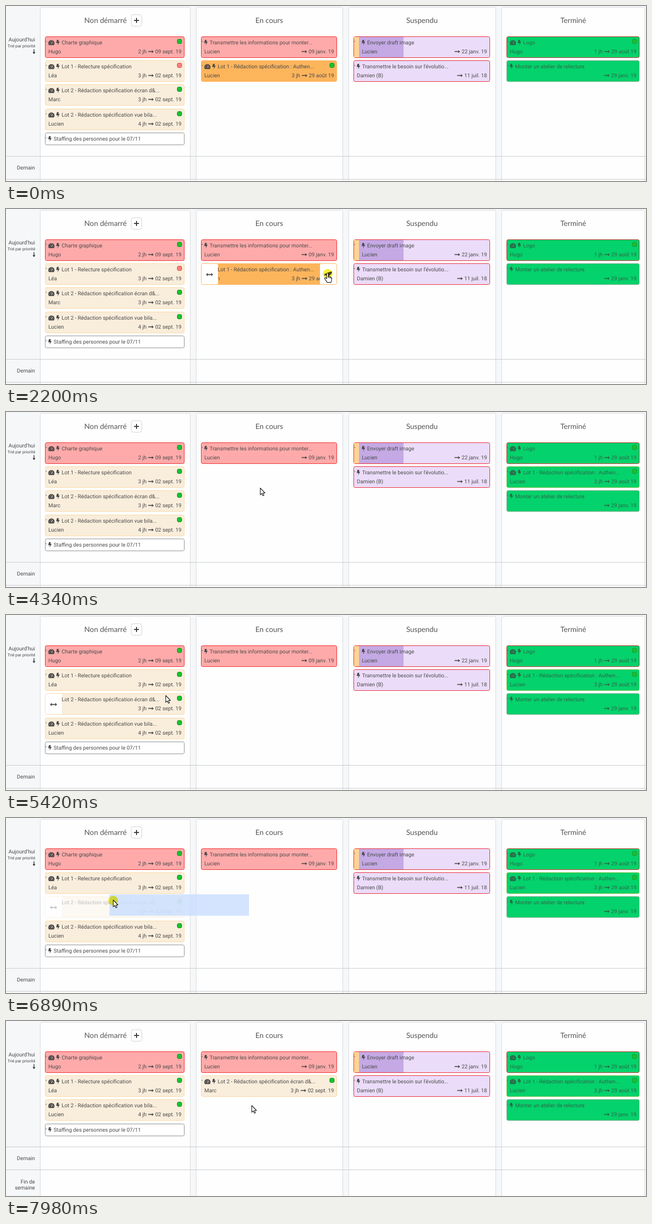
Write an HTML page that moves like this. It is 1280 by 351 pixels and loops after 8 s.

```html
<!DOCTYPE html>
<html lang="fr">
<head>
<meta charset="utf-8">
<title>Tableau des tâches</title>
<style>
  html, body { margin: 0; width: 100%; height: 100%; overflow: hidden; background: #f6f7f9; }
  svg { display: block; width: 100%; height: 100%; }
  text { font: 10.65px Roboto, sans-serif; fill: #4a4a4a; text-rendering: geometricPrecision; }
  .head { font: 14.7px Lato, sans-serif; fill: #555; text-anchor: middle; }
  .end { text-anchor: end; }
  .mid { text-anchor: middle; }
  .bold { font-weight: 700; }
  .link { fill: #2196bf; }
  .done text { fill: #2c6747; }
  #popup { filter: drop-shadow(0 2px 4px rgba(0, 0, 0, .28)); }
  #press { mix-blend-mode: multiply; }
</style>
</head>
<body>
<svg id="stage" viewBox="0 0 1280 351"></svg>
<script>
const LOOP = 8000;
const NS = 'http://www.w3.org/2000/svg';
const stage = document.getElementById('stage');

function add(parent, tag, attrs = {}, content) {
  const el = document.createElementNS(NS, tag);
  for (const k in attrs) el.setAttribute(k, attrs[k]);
  if (content !== undefined) el.textContent = content;
  return parent.appendChild(el);
}
const group = (parent, attrs) => add(parent, 'g', attrs);
const text = (parent, x, y, str, cls = '', size) =>
  add(parent, 'text', { x, y, class: cls, ...(size && { style: `font-size:${size}px` }) }, str);
const path = (parent, d, attrs) => add(parent, 'path', { d, ...attrs });
const box = (parent, x, y, width, height, fill, attrs) =>
  add(parent, 'rect', { x, y, width, height, fill, ...attrs });
const frame = (parent, x, y, w, h, fill, stroke, rx = 3) =>
  box(parent, x + .5, y + .5, w - 1, h - 1, fill, { stroke, rx });
const show = (el, on) => el.setAttribute('visibility', on ? 'visible' : 'hidden');
const move = (el, x, y) => el.setAttribute('transform', `translate(${x} ${y})`);

// Icons
const INK = '#4a4a4a';
const BOLT = 'M1.5 0H5.2L4.2 3.6H7L2.8 11 3.6 6.2H0Z';
const ARROW = 'M0 3.2H7.4V1L11 4 7.4 7V4.8H0Z';
const BOTH = 'M-7 0L-3.6-3.4V-1H3.6V-3.4L7 0 3.6 3.4V1H-3.6V3.4Z';
const ROCKET = 'M8-6Q1-6-2-2H-6L-8 2-4 1.5-1 4.5-1.5 7 2 5 2.5 2Q8-1 8-6Z';

function gauge(parent, x, y, bg, ink) {
  const g = group(parent, { transform: `translate(${x} ${y})` });
  path(g, 'M1.4 10.5A6.2 6.2 0 1 1 11 10.5Z', { fill: ink });
  path(g, 'M6.2 8L8.3 3.6M2.3 7h1M3.4 4h1M6 2.6h.6M9.3 7h1', { stroke: bg, 'stroke-width': 1.1 });
}

// Columns
const COLS = [
  { x: 68, w: 301, card: 78, cw: 279, name: 'Non démarré', cx: 199 },
  { x: 380, w: 294, card: 390, cw: 272, name: 'En cours', cx: 526.5 },
  { x: 685, w: 295, card: 695, cw: 273, name: 'Suspendu', cx: 832 },
  { x: 991, w: 287, card: 1001, cw: 266, name: 'Terminé', cx: 1134.5 }
];
for (const c of COLS) {
  frame(stage, c.x, 2, c.w, 360, '#fefefe', '#d6d9dd');
  text(stage, c.cx, 34, c.name, 'head');
}
frame(stage, 250, 17, 22, 24, '#fff', '#cfcfcf', 4);
path(stage, 'M256 29H266M261 24V34', { stroke: '#3a3a3a', 'stroke-width': 2 });
const target = box(stage, 380.5, 2.5, 293, 360, 'none', { stroke: '#000' });

// Row labels and separators
text(stage, 58, 71, "Aujourd'hui", 'end');
text(stage, 58.5, 82.5, 'Trié par priorité', 'end', 8.2);
path(stage, 'M55.3 86.5H56.7V92.5H58.8L56 96.5 53.2 92.5H55.3Z', { fill: '#333' });
const rows = group(stage);
for (const y of [301.5, 347.5]) path(rows, `M0 ${y}H1280`, { stroke: '#c6c8ca' });
text(rows, 58, 328, 'Demain', 'end');
text(rows, 58, 375, 'Fin de', 'end');
text(rows, 58, 387, 'semaine', 'end');

// Cards
const STYLES = {
  red: ['#ffaaaa', '#ee2222'],
  beige: ['#f9eddb', '#fbd9a2'],
  orange: ['#fdb55c', '#fdb55c'],
  lilac: ['#ebdcf9', '#e8202a'],
  white: ['#fff', '#8a8a8a'],
  doneRed: ['#04d26c', '#c8281e'],
  doneGrey: ['#04d26c', '#7fa88f'],
  doneOrange: ['#04d26c', '#7cc23c']
};
const DOTS = { green: ['#18c230', '#0c8a1e'], red: ['#fb807c', '#d8433f'], done: ['#1dbd2c', '#129a35'] };
const rowY = i => Math.floor(61 + 48.4 * i);

function dot(parent, x, kind) {
  const [fill, stroke] = DOTS[kind];
  return box(parent, x - 4.5, 5.5, 9, 9, fill, { stroke, rx: 3 });
}

function card(col, row, style, title, o = {}) {
  const { card: x, cw: w } = COLS[col];
  const h = o.who ? 43 : 25;
  const [fill, stroke] = STYLES[style];
  const done = col === 3;
  const ink = done ? '#2c6747' : INK;
  const g = group(stage, { class: done ? 'done' : '' });
  frame(g, 0, 0, w, h, fill, stroke);
  const pad = o.striped ? 10 : 0;
  if (o.striped) {
    box(g, 1, 1, 10, h - 2, '#fcd596');
    box(g, 11, 1, 89, h - 2, '#c4a9e4');
  }
  box(g, 1.6, 9.6, 1.6, 1.2, ink);
  if (o.gauge) gauge(g, 6.6, 7, fill, ink);
  path(g, BOLT, { fill: ink, transform: `translate(${o.gauge ? 22.4 : 6.4 + pad} 7)` });
  text(g, (o.gauge ? 33.3 : 17.2) + pad, 16.2, title);
  if (o.who) {
    if (o.who !== ' ') text(g, 6.7 + pad, 34.4, o.who);
    const len = text(g, w - 6, 34.4, o.date, 'end').getComputedTextLength();
    const ax = w - 6 - len - 14;
    path(g, ARROW, { fill: ink, transform: `translate(${ax} 26.4)` });
    if (o.load) text(g, ax - 3.2, 34.4, o.load, 'end');
  }
  if (o.dot) g.dot = dot(g, w - 10, o.dot);
  g.place = r => move(g, x, rowY(r));
  g.place(row);
  return g;
}

// White handle drawn over one end of a hovered card
function handle(parent, x, icon) {
  const g = group(parent);
  box(g, x, 1, 33, 41, '#fff', { rx: 2 });
  path(g, icon, { fill: INK, transform: `translate(${x + 16} 22.5)` });
  return g;
}

const SEPT = '02 sept. 19';
card(0, 0, 'red', 'Charte graphique', { gauge: 1, who: 'Hugo', load: '2 jh', date: '09 sept. 19', dot: 'green' });
const review = card(0, 1, 'beige', 'Lot 1 - Relecture spécification', { gauge: 1, who: 'Léa', load: '3 jh', date: SEPT, dot: 'red' });
const screen = { gauge: 1, who: 'Marc', load: '3 jh', date: SEPT, dot: 'green' };
const screenTitle = 'Lot 2 - Rédaction spécification écran d&...';
const todo = card(0, 2, 'beige', screenTitle, screen);
const todoHandle = handle(todo, 1, BOTH);
const report = card(0, 3, 'beige', 'Lot 2 - Rédaction spécification vue bila...', { gauge: 1, who: 'Lucien', load: '4 jh', date: SEPT, dot: 'green' });
const staffing = card(0, 4, 'white', 'Staffing des personnes pour le 07/11');

card(1, 0, 'red', 'Transmettre les informations pour monter...', { who: 'Lucien', date: '09 janv. 19' });
const auth = { gauge: 1, who: 'Lucien', load: '3 jh', date: '29 août 19' };
const authTitle = 'Lot 1 - Rédaction spécification : Authen...';
const doing = card(1, 1, 'orange', authTitle, { ...auth, dot: 'green' });
const doingHandles = group(doing);
handle(doingHandles, 1, BOTH);
handle(doingHandles, 238, ROCKET);
const started = card(1, 1, 'beige', screenTitle, screen);

card(2, 0, 'lilac', 'Envoyer draft image', { striped: 1, who: 'Lucien', date: '22 janv. 19' });
card(2, 1, 'lilac', "Transmettre le besoin sur l'évolutio...", { who: 'Damien (B)', date: '11 juil. 18' });

card(3, 0, 'doneRed', 'Logo', { gauge: 1, who: 'Hugo', load: '1 jh', date: '29 août 19', dot: 'done' });
const finished = card(3, 1, 'doneOrange', authTitle, { ...auth, dot: 'done' });
const workshop = card(3, 1, 'doneGrey', 'Monter un atelier de relecture', { who: ' ', date: '29 janv. 19' });

// Popup
const popup = group(stage, { id: 'popup' });
box(popup, 418, 109, 246, 108, '#fff');
text(popup, 431, 132, 'Quand pensez-vous terminer cette tâche?', 'bold');
frame(popup, 431, 143, 92, 19, '#fff', '#cfcfcf', 4);
text(popup, 477, 155.5, 'Terminer maintenant', 'mid', 9.1);
text(popup, 533, 156, 'ou sélectionnez une date', 'link');
text(popup, 558, 194.5, 'Manuel', 'link');
frame(popup, 601, 179, 49, 24, '#fff', '#cfcfcf', 4);
text(popup, 625.5, 194.5, 'Annuler', 'mid');

// Drag image, click highlight and pointers
const dragged = box(stage, 0, 0, 279, 43, '#cbdfff', { opacity: .82 });
const press = add(stage, 'circle', { id: 'press', r: 9.7, fill: '#f8f03c' });
const pointer = group(stage);
const shape = (d, stroke) => path(pointer, d, { fill: '#fff', stroke, 'stroke-width': 1.1, 'stroke-linejoin': 'round' });
const POINTERS = {
  arrow: shape('M.5 .5V14.2L3.6 11.3 5.8 16 8 15 5.9 10.5H10Z', '#111'),
  hand: shape('M-1.6 1.4Q0-.4 1.5 1.4V7.6Q3.9 6.8 4.3 8.3 6.3 7.8 6.7 9.3 8.4 9 8.4 11V14Q8 17 7 19.4H-.8Q-2 16-5.4 12.3-6.4 10-4.4 9.8-3 10.2-1.6 12ZM1.5 7.6V10.5M4.3 8.3V10.8M6.7 9.3V11.3', '#111'),
  move: shape('M0-10L4-6H1.5V-1.5H6V-4L10 0 6 4V1.5H1.5V6H4L0 10-4 6H-1.5V1.5H-6V4L-10 0-6-4V-1.5H-1.5V-6H-4Z', '#333')
};

// Pointer path: time, x, y
const KEYS = [
  [0, 1090, 356], [290, 1090, 356], [660, 928, 275], [930, 928, 275],
  [1730, 662, 143], [1760, 662, 143], [1910, 643, 128], [2890, 643, 128],
  [3150, 607, 144], [3540, 444, 143], [3890, 444, 143], [4340, 508, 152],
  [5050, 508, 152], [5790, 131, 170], [5890, 131, 170], [5970, 95, 173],
  [6080, 85, 168], [6590, 85, 168], [7220, 392, 153], [7360, 409, 144],
  [7410, 409, 144], [7450, 416, 143], [7670, 416, 143], [7980, 491, 169], [LOOP, 491, 169]
];

// Monotone cubic interpolation, so the pointer never overshoots a key
function slope(i, axis) {
  const [a, b, c] = [KEYS[i - 1], KEYS[i], KEYS[i + 1]];
  if (!a || !c) return 0;
  const s = (b[axis] - a[axis]) / (b[0] - a[0]);
  const e = (c[axis] - b[axis]) / (c[0] - b[0]);
  return s * e > 0 ? 2 * s * e / (s + e) : 0;
}
function pointerAt(t, axis) {
  const i = Math.max(0, KEYS.findIndex(k => k[0] > t) - 1);
  const [a, b] = [KEYS[i], KEYS[i + 1]];
  const h = b[0] - a[0], u = (t - a[0]) / h, v = 1 - u;
  return a[axis] * v * v * (1 + 2 * u) + b[axis] * u * u * (3 - 2 * u)
    + h * u * v * (v * slope(i, axis) - u * slope(i + 1, axis));
}

const ramp = (t, from, to) => {
  const u = Math.min(1, Math.max(0, (t - from) / (to - from)));
  return u * u * (3 - 2 * u);
};
const within = (t, from, to) => t >= from && t < to;

const OPEN = 2330, CLOSE = 3840, DONE = 4100, GRAB = 6290, DRAG = 6590, DROP = 7670, MOVED = 7760;

function draw(t) {
  const x = pointerAt(t, 1), y = pointerAt(t, 2);
  const over = (l, top, w, h) => x >= l && x < l + w && y >= top && y < top + h;
  const done = t >= DONE, moved = t >= MOVED;
  const dragging = within(t, DRAG, DROP);

  const hoverDoing = t < OPEN && over(390, 109, 272, 43);
  const hoverTodo = t >= 5050 && t < DRAG && over(78, 157, 279, 43);

  show(doing, !done);
  doingHandles.setAttribute('display', hoverDoing ? 'inline' : 'none');
  show(finished, done);
  workshop.place(done ? 2 : 1);
  const [fill, stroke] = DOTS[done ? 'green' : 'red'];
  review.dot.setAttribute('fill', fill);
  review.dot.setAttribute('stroke', stroke);

  show(todo, !moved);
  todo.setAttribute('opacity', t >= DRAG ? .33 : 1);
  todoHandle.setAttribute('display', hoverTodo || t >= DRAG ? 'inline' : 'none');
  show(started, moved);
  report.place(moved ? 2 : 3);
  staffing.place(moved ? 3 : 4);
  move(rows, 0, moved ? -49 : 0);

  const p = ramp(t, OPEN, 2640) * (1 - ramp(t, CLOSE, 4060));
  show(popup, p > 0);
  popup.setAttribute('opacity', p);
  move(popup, 0, -12 * (1 - p));

  show(target, dragging && x > 380);
  show(dragged, dragging);
  move(dragged, Math.round(x - 7), Math.round(y - 11));

  show(press, within(t, 2200, OPEN) || within(t, 3710, CLOSE) || within(t, GRAB, DROP));
  move(press, x + .5, y + 2);

  let kind = 'arrow';
  if (hoverDoing && x > 628 || p > 0 && over(431, 142, 92, 20)) kind = 'hand';
  if (hoverTodo && x < 112) kind = 'move';
  for (const k in POINTERS) show(POINTERS[k], k === kind);
  move(pointer, Math.round(x), Math.round(y));
}

const start = performance.now();
function tick() {
  draw((performance.now() - start) % LOOP);
  requestAnimationFrame(tick);
}
tick();
</script>
</body>
</html>
```
